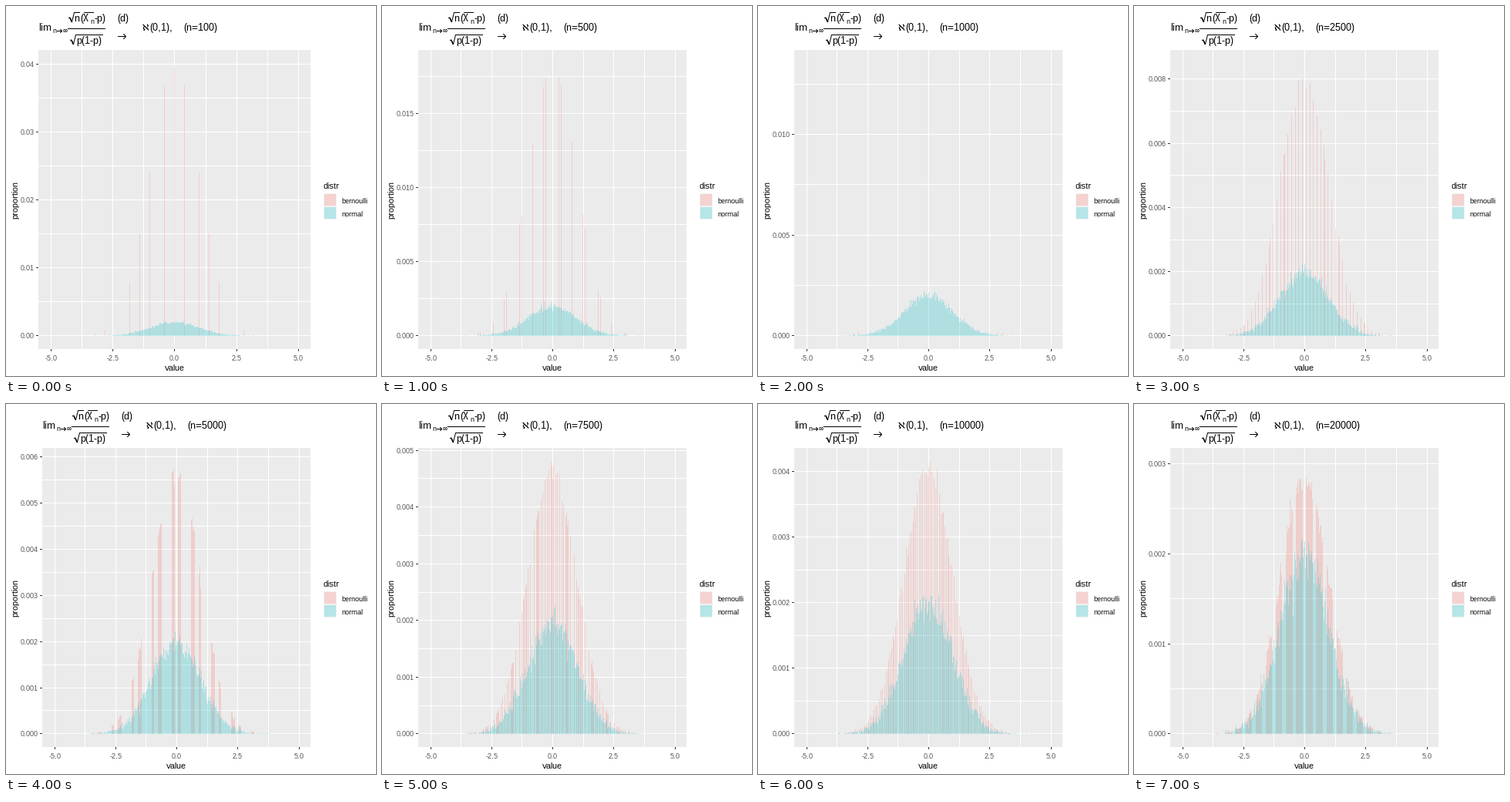
Animation, 480 px wide and 480 px high, one loop 8 s. Source, as a matplotlib script:

```python
import math

import matplotlib.pyplot as plt
import numpy as np
from matplotlib.animation import FuncAnimation
from matplotlib.patches import Rectangle

plt.rcParams["font.family"] = "Liberation Sans"
plt.rcParams["text.hinting"] = "native"
plt.rcParams["text.hinting_factor"] = 1

SIZE, DPI = 480, 100
PT = 72 / DPI
TOP, BOTTOM, RIGHT, EDGE = 57, 445, 395, 395.35
ZERO, FLOOR = 427.4, 428    # zero level of the grid, lower end of the bars
BAR_SPAN = 353              # height in px of the tallest bin
BINS = 100                  # bins per unit of value
PINK, TEAL = "#F8766D", "#00BFC4"
ALPHA = 0.25

# sample size, largest proportion, y step, label decimals
STEPS = [
    (100, 0.04010, 0.01, 2),
    (500, 0.01835, 0.005, 3),
    (1000, 0.01350, 0.005, 3),
    (2500, 0.00848, 0.002, 3),
    (5000, 0.00590, 0.001, 3),
    (7500, 0.00480, 0.001, 3),
    (10000, 0.00415, 0.001, 3),
    (20000, 0.00302, 0.001, 3),
]

fig = plt.figure(figsize=(SIZE / DPI, SIZE / DPI), dpi=DPI, facecolor="white")
ax = fig.add_axes([0, 0, 1, 1])


def rect(x, y, w, h, color, alpha=1):
    ax.add_patch(Rectangle((x, y), w, h, facecolor=color, alpha=alpha,
                           linewidth=0, antialiased=False))


def text(x, y, s, size, color="black", ha="left", **kw):
    kw.setdefault("va", "baseline")
    ax.text(x, y, s, fontsize=size * PT, color=color, ha=ha, **kw)


def path(xs, ys, width=1.0):
    ax.plot(xs, ys, color="black", linewidth=width * PT,
            solid_capstyle="butt", solid_joinstyle="miter")


def radical(x, top, end):
    path([x, x + 1.8, x + 4.4, x + 7.5], [top + 8, top + 6.8, top + 13, top + 0.5])
    path([x + 2, x + 4.4], [top + 7.5, top + 12.5], 1.5)
    rect(x + 7, top, end - x - 7, 1, "black")


def title(x, n):
    text(x, 32, "lim", 13)
    text(x + 18, 35, "n", 9)
    text(x + 23, 36, "→", 10, family="DejaVu Sans")
    text(x + 32, 35, "∞", 9)
    radical(x + 39, 8, x + 54)
    text(x + 46, 20, "n", 13)
    text(x + 54, 20, "(", 13)
    text(x + 58, 20, "X", 13)
    rect(x + 59, 8, 13, 1, "black")
    text(x + 67, 23, "n", 9)
    text(x + 72, 20, "-p)", 13)
    rect(x + 38, 29, 49, 1, "black")
    radical(x + 41, 37, x + 84)
    text(x + 49, 49, "p(1-p)", 13)
    text(x + 102, 20, "(d)", 13)
    text(x + 102, 44, "→", 15, family="DejaVu Sans")
    text(x + 134, 32, r"$\aleph$", 13, math_fontfamily="stix")
    text(x + 144, 32, "(0,1),", 13)
    text(x + 188, 32, f"(n={n})", 13)


def legend():
    text(412, 237, "distr", 11)
    for y, color, name in ((243, PINK, "bernoulli"), (260, TEAL, "normal")):
        rect(412, y, 17, 17, "#F2F2F2")
        rect(413, y + 1, 15, 15, color, ALPHA)
        text(435, y + 13, name, 9)


def normal_bins(rng):
    v = np.arange(-5 * BINS, 5 * BINS + 1) / BINS
    p = np.exp(-v * v / 2) / math.sqrt(2 * math.pi) / BINS / 2
    return rng.poisson(p * 1e5) / 1e5


def bernoulli_bins(n, rng):
    p = np.zeros(10 * BINS + 1)
    reach = int(2.5 * math.sqrt(n))
    for k in range(max(0, n // 2 - reach), min(n, n // 2 + reach) + 1):
        log_p = (math.lgamma(n + 1) - math.lgamma(k + 1)
                 - math.lgamma(n - k + 1) - n * math.log(2))
        i = round((2 * k - n) / math.sqrt(n) * BINS) + 5 * BINS
        if 0 <= i < len(p):
            p[i] += math.exp(log_p) / 2
    return rng.poisson(p * 4e5) / 4e5


def bars(props, cols, index, scale, color):
    heights = np.minimum(np.round(props[index] * scale), BAR_SPAN)
    ax.stairs(FLOOR - heights, np.append(cols, cols[-1] + 1), baseline=FLOOR,
              fill=True, color=color, alpha=ALPHA, linewidth=0,
              antialiased=False)


def draw(i):
    n, peak, step, digits = STEPS[i]
    rng = np.random.default_rng(40 + i)
    left, unit = (42, 32.155) if digits == 2 else (47, 31.7)
    mid = EDGE - 5.5 * unit
    scale = BAR_SPAN / peak

    ax.clear()
    ax.set(xlim=(0, SIZE), ylim=(SIZE, 0))
    ax.axis("off")
    rect(left, TOP, RIGHT - left, BOTTOM - TOP, "#EBEBEB")

    # every second grid line carries a tick and a label
    for k in range(-4, 5):
        x = round(mid + k * 1.25 * unit)
        if abs(k) < 4 or k % 2 == 0:
            rect(x, TOP, 1, BOTTOM - TOP, "white")
        if k % 2 == 0:
            rect(x, BOTTOM, 1, 3, "#333333")
            text(x + 0.5, 460, f"{k * 1.25:.1f}", 9, "#4D4D4D", "center")
    for k in range(16):
        y = round(ZERO - k * step / 2 * scale)
        if y <= TOP:
            break
        rect(left, y, RIGHT - left, 1, "white")
        if k % 2 == 0:
            rect(left - 3, y, 3, 1, "#333333")
            text(left - 5, y + 4, f"{k * step / 2:.{digits}f}", 9, "#4D4D4D", "right")

    # each pixel column shows the one bin under its centre
    cols = np.arange(math.ceil(mid - 5 * unit), int(mid + 5 * unit))
    index = np.rint((cols + 0.5 - mid) / unit * BINS).astype(int) + 5 * BINS
    bars(bernoulli_bins(n, rng), cols, index, scale, PINK)
    bars(normal_bins(rng), cols, index, scale, TEAL)

    text(mid, 473, "value", 11, ha="center")
    text(12, 251.5, "proportion", 11, ha="center", va="center", rotation=90)
    title(left, n)
    legend()
    return []


anim = FuncAnimation(fig, draw, frames=len(STEPS), interval=1000, repeat=True)
plt.show()
```
